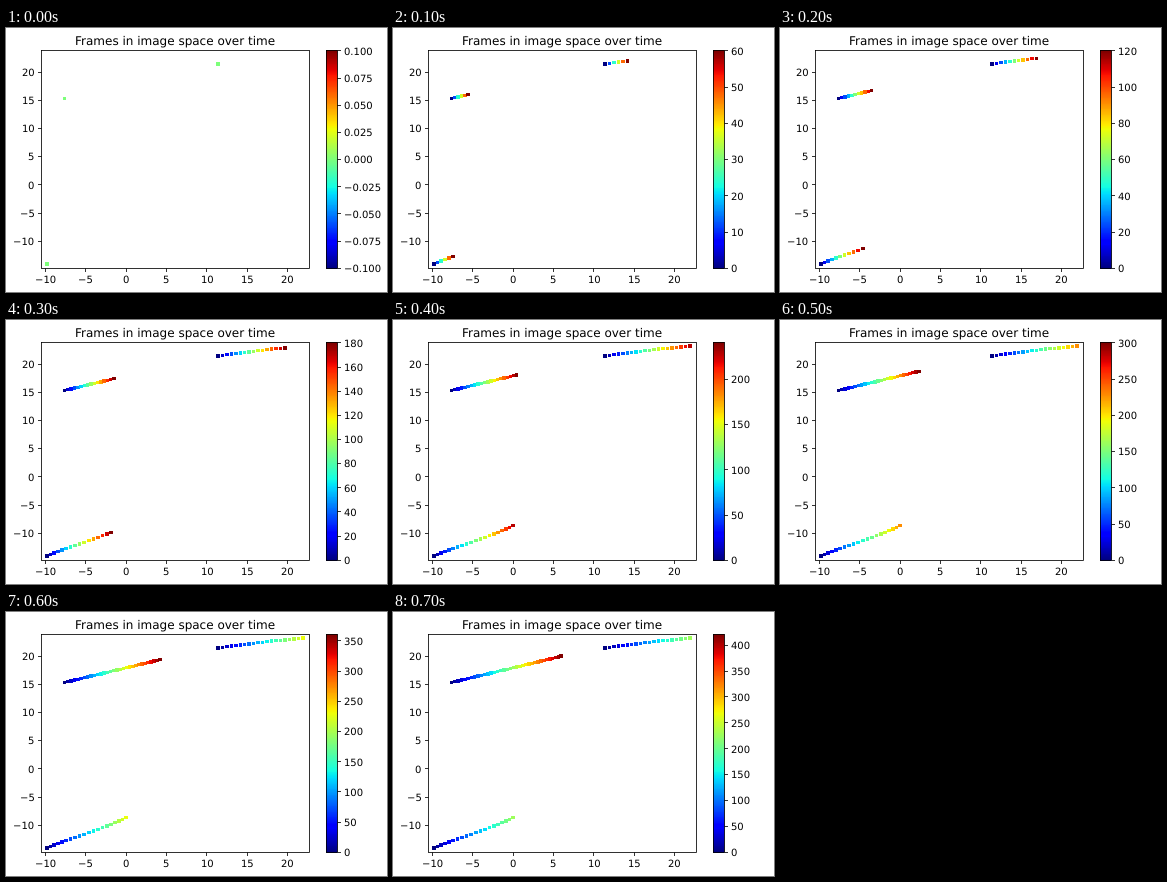
These frames come from a looping animation (381 by 264 pixels, 800 ms). An HTML page with a canvas:

```html
<!DOCTYPE html>
<html lang="en">
<head>
<meta charset="utf-8">
<title>Frames in image space over time</title>
<style>
  html, body { margin: 0; width: 100%; height: 100%; overflow: hidden; background: #fff; }
  canvas { display: block; }
</style>
</head>
<body>
<canvas id="plot" width="381" height="264"></canvas>
<script>
const ctx = document.getElementById('plot').getContext('2d');
const FONT = '"DejaVu Sans", sans-serif';
const STEP_MS = 100, STEPS = 8, SAMPLE = 12, MARK = 3.45;
const box = { l: 35.5, r: 303.5, t: 22.5, b: 240.5 };
const bar = { l: 320.5, r: 331.5, base: 240.3, h: 217.44 };
const px = v => 120 + 8.09 * v;
const py = v => 156.8 - 5.64 * v;

// Pixel position as a function of sample time, up to the last sample
const tracks = [
  { end: Infinity, x: t => 58.5 + .277 * t - 9e-8 * t ** 3, y: t => 70.5 - .067 * t + 1e-5 * t * t },
  { end: 228, x: t => 212 + .3705 * t + 1e-5 * t * t, y: t => 36 - .053 * t + 4.1e-5 * t * t },
  { end: 228, x: t => 41 + .3465 * t - 1.8 * Math.sin(t * Math.PI / 114), y: t => 236 - .122 * t - 5e-5 * t * t }
];

// Jet colour map in 256 levels: each channel is a clamped ramp up and down
function color(value) {
  const v = Math.min(255, Math.max(0, Math.floor(value * 256))) / 255;
  const ramp = (up, down) => Math.round(255 * Math.max(0, Math.min(1, up, down)));
  const r = ramp((v - .35) / .31, 1 - (v - .89) / .22);
  const g = ramp((v - .125) / .25, (.91 - v) / .27);
  const b = ramp(.5 + v / .22, (.65 - v) / .31);
  return `rgb(${r},${g},${b})`;
}

function line(x1, y1, x2, y2) {
  ctx.beginPath();
  ctx.moveTo(x1, y1);
  ctx.lineTo(x2, y2);
  ctx.stroke();
}

// Text starts on whole pixels; anchor 0 is left, .5 centre, 1 right
function label(value, x, y, anchor, size = 10) {
  const text = String(value).replace('-', '\u2212');
  ctx.font = `${size}px ${FONT}`;
  ctx.textRendering = 'geometricPrecision';
  ctx.fillStyle = '#000';
  ctx.fillText(text, Math.round(x - anchor * ctx.measureText(text).width), Math.round(y));
}

const snap = v => Math.floor(v) + .5;

function drawAxes() {
  for (let v = -10; v <= 20; v += 5) {
    const x = px(v), y = py(v);
    line(snap(x), box.b, snap(x), box.b + 3.5);
    label(v, x, 255, .5);
    line(box.l - 3.5, snap(y), box.l, snap(y));
    label(v, 28.4, y + 3.8, 1);
  }
  ctx.strokeRect(box.l, box.t, box.r - box.l, box.b - box.t);
  label('Frames in image space over time', 169.3, 17, .5, 12);
}

function drawBar(max) {
  for (let y = 22; y < 241; y++) {
    ctx.fillStyle = color((bar.base - y - .5) / bar.h);
    ctx.fillRect(bar.l - .5, y, bar.r - bar.l + .5, 1);
  }
  ctx.strokeRect(bar.l, box.t, bar.r - bar.l, box.b - box.t);
  const lo = max ? 0 : -.1, hi = max || .1;
  const step = max ? [10, 20, 50].find(s => s * 9 >= max) : .025;
  const count = Math.floor((hi - lo) / step + 1e-6);
  for (let i = 0; i <= count; i++) {
    const v = lo + i * step;
    const y = bar.base - bar.h * i * step / (hi - lo);
    line(bar.r, snap(y), bar.r + 3.5, snap(y));
    label(max ? v : v.toFixed(3), 338, y + 3.8, 0);
  }
}

function drawTrack({ x, y, end }, max) {
  const r = MARK / 2;
  for (let t = 0; t <= Math.min(max, end); t += SAMPLE) {
    const left = Math.round(x(t) - r), top = Math.round(y(t) - r);
    ctx.fillStyle = color(max ? t / max : .5);
    ctx.fillRect(left, top, Math.round(x(t) + r) - left, Math.round(y(t) + r) - top);
  }
}

function draw(step) {
  const max = step * 60;
  ctx.fillStyle = '#fff';
  ctx.fillRect(0, 0, 381, 264);
  ctx.strokeStyle = '#000';
  ctx.lineWidth = .8;
  tracks.forEach(track => drawTrack(track, max));
  drawAxes();
  drawBar(max);
}

const start = performance.now();
function tick() {
  draw(Math.floor((performance.now() - start) / STEP_MS) % STEPS);
  requestAnimationFrame(tick);
}
tick();
</script>
</body>
</html>
```
